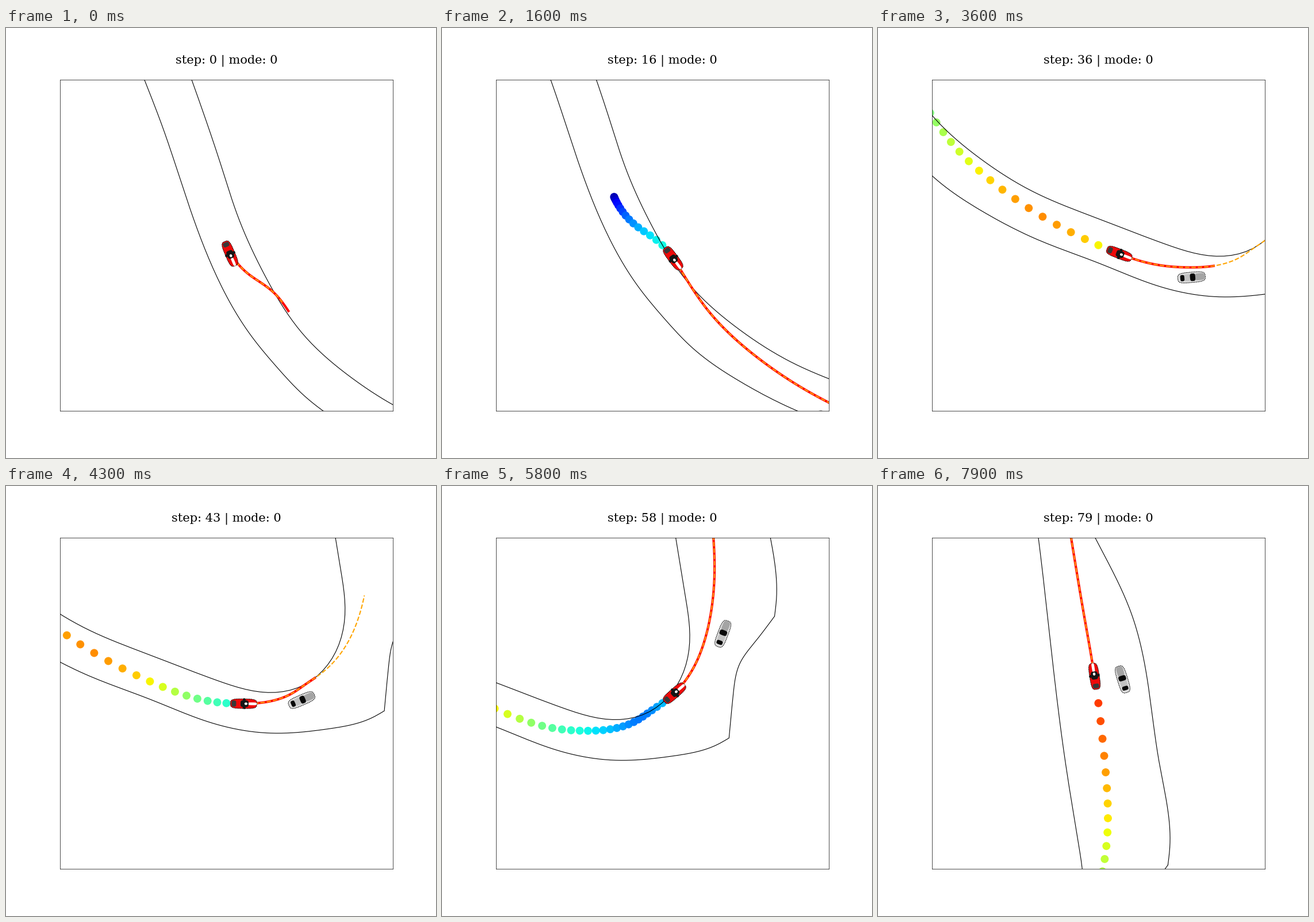
Animation, 748 px wide and 748 px high, one loop 8000 ms. Source, as a matplotlib script:

```python
import numpy as np
import matplotlib.pyplot as plt
from matplotlib.animation import FuncAnimation
from matplotlib.patches import Polygon

SIZE, DPI, STEPS = 748, 100, 80
HALF = np.array([289.85, 287.98])
HOME = np.array([383.35, 377.74])


def spline(t, y):
    """Natural cubic spline through rows y at knots t."""
    t, y = np.asarray(t, float), np.asarray(y, float)
    h, n = np.diff(t), len(t)
    slope = np.diff(y, axis=0) / h[:, None]
    A, b = np.eye(n), np.zeros_like(y)
    for i in range(1, n - 1):
        A[i, i - 1:i + 2] = h[i - 1], 2 * (h[i - 1] + h[i]), h[i]
        b[i] = 6 * (slope[i] - slope[i - 1])
    m = np.linalg.solve(A, b)

    def at(x):
        x = np.clip(np.atleast_1d(x).astype(float), t[0], t[-1])
        i = np.clip(np.searchsorted(t, x, side="right") - 1, 0, n - 2)
        d, w = (x - t[i])[:, None], h[i][:, None]
        return (y[i] + d * (slope[i] - w * (2 * m[i] + m[i + 1]) / 6)
                + d ** 2 * m[i] / 2 + d ** 3 * (m[i + 1] - m[i]) / (6 * w))
    return at


def curve(*pts):
    """Smooth line through a few points, by chord length."""
    pts = np.array(pts) - HOME
    s = np.r_[0, np.cumsum(np.hypot(*np.diff(pts, axis=0).T))]
    return spline(s, pts)(np.linspace(0, s[-1], 150))


# Red car, one key point every four steps
ego_keys = [
    (0, 0), (3, 6.5), (15, 26), (42, 53), (84, 84), (121, 135.5), (167, 202),
    (235.5, 268.5), (326.5, 332), (423.5, 381.5), (506, 411.5), (571.5, 420),
    (624.5, 417.5), (665.5, 405), (697, 384.5), (735, 356), (772, 305.5),
    (796.5, 232), (806, 139.5), (799.5, 31), (785, -92.5), (763, -222),
    (741.5, -351), (720, -480)]
ego_at = spline(4 * np.arange(len(ego_keys)), ego_keys)

# Grey car: x, y, heading in degrees
rival_at = spline([0, 16, 36, 50, 58, 70, 79], [
    (310, 357, -28), (375, 387, -24), (585.5, 437.5, 5), (771.5, 355.5, 44),
    (820.5, 251.5, 69), (850, 71, 104), (831.5, -102, 107)])

INNER = curve(
    (313, 62), (323, 90), (376, 245), (402, 324), (449, 428), (517.5, 533.5),
    (598.5, 606.5), (694, 666.5), (807.5, 713.5), (923.5, 757.5), (1022, 778.5),
    (1071.5, 767), (1125, 717), (1146, 644), (1138.5, 564), (1112.5, 400),
    (1068.5, 30), (1062, -20))
OUTER = np.vstack([
    curve((240, 88), (273, 174), (320, 314), (371, 441.5), (424, 532),
          (473, 592), (517.5, 638.5), (603.5, 699.5), (702, 750), (807.5, 790.5),
          (913, 831), (1013, 849), (1119, 841.5), (1193, 822.5), (1214.5, 810.5)),
    curve((1214.5, 810.5), (1222, 732.5), (1233, 681.5), (1260, 643),
          (1293.7, 598.7)),
    curve((1293.7, 598.7), (1297, 568), (1278.5, 420), (1251.5, 240),
          (1231.5, 165), (1167.5, 30), (1142, -20))])

TRAIL = ego_at(np.arange(STEPS + 5))
gap = np.hypot(*np.diff(TRAIL, axis=0).T)
speed = np.minimum(gap, np.r_[gap[0], gap[:-1]])
COLORS = plt.cm.jet(np.maximum(speed * .0268, .05))


def blob(cu, cv, ru, rv, p=.55):
    """Rounded box in car axes, u forward."""
    a = np.linspace(0, 2 * np.pi, 40, endpoint=False)
    c, s = np.cos(a), np.sin(a)
    return np.c_[cu + ru * np.sign(c) * abs(c) ** p, cv + rv * np.sign(s) * abs(s) ** p]


fig = plt.figure(figsize=(SIZE / DPI, SIZE / DPI), dpi=DPI, facecolor="white")
ax = fig.add_axes([.125, .11, .775, .77])
ax.set(xticks=[], yticks=[])
for spine in ax.spines.values():
    spine.set(linewidth=.5, color="black", zorder=10)
title = ax.set_title("", size=15, family="DejaVu Serif", pad=20)

dots = ax.scatter([], [], s=100, edgecolors="none", zorder=1)
for edge in (INNER, OUTER):
    ax.plot(*edge.T, color="black", lw=.8, zorder=2)
plan, = ax.plot([], [], color="red", lw=3, zorder=3, solid_capstyle="butt")
ref, = ax.plot([], [], color="orange", lw=1.5, ls="--", zorder=4)


def add_car(z, *parts):
    """Body first, with a dotted rim, then the details."""
    return [(shape, ax.add_patch(Polygon(
        shape, fc=fill, ec="none" if i else "black", lw=.7, ls=(0, (2, 1)), zorder=z)))
        for i, (fill, shape) in enumerate(parts)]


rival = add_car(
    5, ("#dcdcdc", blob(0, 0, 24, 9)), ("#a4a4a4", blob(14, 0, 9, 6)),
    ("#c2c2c2", blob(-7, 0, 7, 6)), ("#080808", blob(2, 0, 4.6, 6.6)),
    ("#080808", blob(-16, 0, 3.6, 5.4)))
ego = add_car(
    6, ("#ee0a0a", blob(0, 0, 23, 8.4)), ("white", blob(15, 0, 8, 2.4)),
    ("#151515", blob(1, 0, 2.6, 9.4)), ("#151515", blob(1.5, 0, 7, 6)),
    ("white", blob(4, 0, 2.6, 2.2, 1)), ("#383838", blob(-17, 0, 4, 5.4)))


def place(car, center, angle):
    c, s = np.cos(angle), np.sin(angle)
    for shape, patch in car:
        patch.set_xy(center + shape @ np.array([[c, s], [-s, c]]))


def ahead(k, span):
    return ego_at(np.linspace(k + 1, k + span, 80)).T


def update(k):
    lo, hi = TRAIL[k] - HALF, TRAIL[k] + HALF
    ax.set(xlim=(lo[0], hi[0]), ylim=(hi[1], lo[1]))
    title.set_text(f"step: {k} | mode: 0")
    dots.set_offsets(TRAIL[:k + 1])
    dots.set_facecolor(COLORS[:k + 1])

    # The plan shortens under braking
    accel = (gap[k + 3] - gap[k]) / 3
    plan.set_data(*ahead(k, 16.8 + 3 * accel))
    ref.set_data(*ahead(k, min(25, 17.5 + k / 2)))

    rear = TRAIL[k + 1]
    step = TRAIL[k + 2] - rear
    place(ego, rear + 15 * step / np.hypot(*step), np.arctan2(step[1], step[0]))
    *center, deg = rival_at(k)[0]
    place(rival, center, -np.radians(deg))
    return []


anim = FuncAnimation(fig, update, frames=STEPS, interval=100, repeat=True,
                     repeat_delay=0, blit=False)
plt.show()
```
